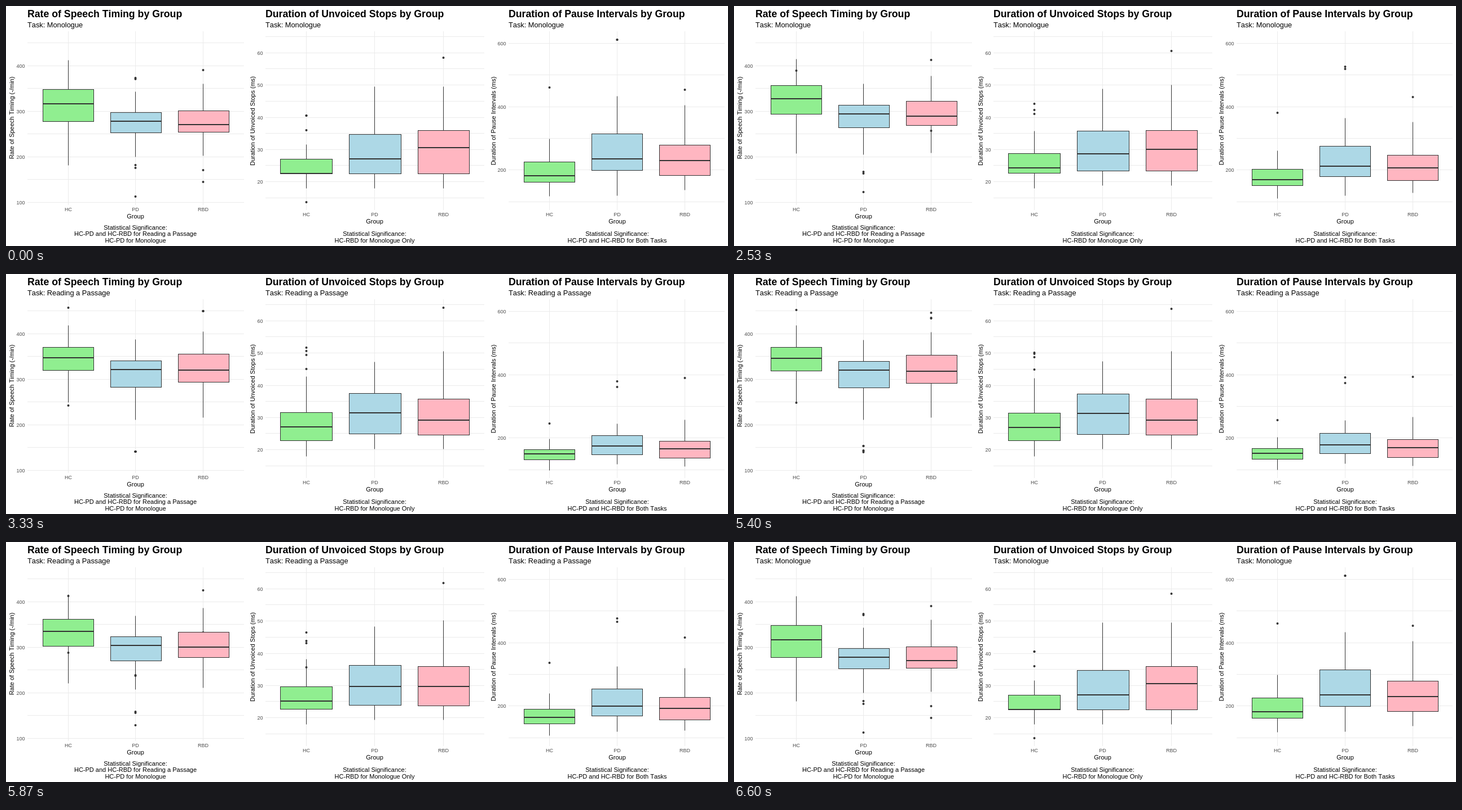
Animation, 1280 px wide and 427 px high, one loop 6670 ms. Source, as an HTML page with a canvas:

```html
<!DOCTYPE html>
<html lang="en">
<head>
<meta charset="utf-8">
<title>Speech measures by group</title>
<style>
  html, body { margin: 0; width: 100%; height: 100%; overflow: hidden; background: #fff; }
  canvas { display: block; }
</style>
</head>
<body>
<canvas id="stage" width="1280" height="427"></canvas>
<script>
const ctx = document.getElementById('stage').getContext('2d');
const LOOP = 6670, FRAMES = 100, TRAVEL = 19;
const FILLS = ['#90ee90', '#add8e6', '#ffb6c1'];
const GROUPS = ['HC', 'PD', 'RBD'];
const INK = '#333333';

// Each box: [upper whisker, box top, median, box bottom, lower whisker] per task.
// Each dot: [height for Monologue, height for Reading a Passage].
const panels = [
  {
    title: 'Rate of Speech Timing by Group', yTitle: 'Rate of Speech Timing (-/min)',
    left: 38, right: 422, bottom: 354, yTitleX: 14, yTitleY: 199,
    ticks: { 400: 106, 300: 187, 200: 268, 100: 349 }, minor: [65, 146, 227, 308],
    centers: [110, 229, 349], lefts: [65, 185, 305], widths: [90, 90, 90],
    caption: ['Statistical Significance:', 'HC-PD and HC-RBD for Reading a Passage', 'HC-PD for Monologue'],
    boxes: [
      { from: [96, 148.5, 174, 205.5, 283], to: [91.5, 130, 148.5, 171, 228],
        dots: [[147, 59.5], [147, 234]], hiddenAtStart: true },
      { from: [152, 189.5, 204.5, 225.5, 268], to: [116, 154, 169.5, 201.5, 259],
        dots: [[128, 316], [130, 316], [283, 316], [288, 316], [339, 316]] },
      { from: [138, 186, 210.5, 224.5, 266], to: [102, 142.5, 170.5, 192.5, 255],
        dots: [[114, 66], [292, 66], [313, 66]] }
    ]
  },
  {
    title: 'Duration of Unvoiced Stops by Group', yTitle: 'Duration of Unvoiced Stops (ms)',
    left: 460, right: 848, bottom: 363, yTitleX: 441, yTitleY: 204.5,
    ticks: { 60: 83, 50: 140, 40: 198, 30: 255, 20: 312 }, minor: [54, 111, 169, 226, 283, 341],
    centers: [532, 653, 775], lefts: [486, 608, 730], widths: [92, 92, 91],
    caption: ['Statistical Significance:', 'HC-RBD for Monologue Only'],
    boxes: [
      { from: [246, 272, 298, 298, 324], to: [182, 246.5, 272, 296.5, 324],
        dots: [[195, 137], [221, 143.5], [349, 131], [195, 169]] },
      { from: [143, 228, 272, 298.5, 324], to: [156.5, 212.5, 246.5, 284.5, 311], dots: [] },
      { from: [143, 221, 252, 298.5, 324], to: [137, 222.5, 260, 286, 311], dots: [[92, 60]] }
    ]
  },
  {
    title: 'Duration of Pause Intervals by Group', yTitle: 'Duration of Pause Intervals (ms)',
    left: 891, right: 1274, bottom: 363, yTitleX: 868, yTitleY: 204.5,
    ticks: { 600: 66, 400: 179, 200: 291 }, minor: [122, 235, 348],
    centers: [963, 1083, 1203], lefts: [918, 1038, 1158], widths: [90, 90, 90],
    caption: ['Statistical Significance:', 'HC-PD and HC-RBD for Both Tasks'],
    boxes: [
      { from: [236, 277, 302, 313.5, 338], to: [293, 312.5, 320, 330.5, 349], dots: [[145, 266]] },
      { from: [160, 227, 272, 292.5, 337], to: [266, 287, 306, 321.5, 338], dots: [[60, 191], [60, 201]] },
      { from: [176, 247.5, 275, 301, 327], to: [259, 297.5, 311, 327.5, 342], dots: [[148.5, 185]] }
    ]
  }
];

const mix = (a, b, p) => a + (b - a) * p;
const clamp = v => Math.max(0, Math.min(1, v));
const snap = v => Math.floor(v) + 0.5;

function write(text, x, y, size, align = 'center', color = '#000', weight = '') {
  ctx.font = `${weight} ${size}px "Liberation Sans", Arial, sans-serif`;
  ctx.fontKerning = 'none';
  ctx.textAlign = align;
  ctx.fillStyle = color;
  ctx.fillText(text, x, y);
}

function line(x1, y1, x2, y2, color) {
  ctx.strokeStyle = color;
  ctx.lineWidth = 1;
  ctx.beginPath();
  ctx.moveTo(x1, y1);
  ctx.lineTo(x2, y2);
  ctx.stroke();
}

function drawAxes(panel, task) {
  const { left, right, bottom, centers, ticks, caption } = panel;
  for (const y of [...panel.minor, ...Object.values(ticks)]) line(left, y + 0.5, right, y + 0.5, '#ebebeb');
  for (const x of centers) line(x + 0.5, 45, x + 0.5, bottom, '#ebebeb');

  write(panel.title, left, 20, 17.7, 'left', '#000', 'bold');
  write('Task: ' + task, left, 38, 12.8, 'left');
  for (const label in ticks) write(label, left - 4.5, ticks[label] + 4, 9, 'right', '#4d4d4d');
  centers.forEach((x, i) => write(GROUPS[i], x + 0.5, bottom + 11, 9, 'center', '#4d4d4d'));

  const middle = centers[1] + 0.5;
  write('Group', middle, bottom + 24, 11);
  caption.forEach((text, i) => write(text, middle, 421 - Math.round((caption.length - 1 - i) * 11.6), 11));

  ctx.save();
  ctx.translate(panel.yTitleX, panel.yTitleY);
  ctx.rotate(-Math.PI / 2);
  write(panel.yTitle, 0, 0, 11);
  ctx.restore();
}

function drawBox(box, x, left, width, fill, p) {
  const heights = box.from.map((v, i) => mix(v, box.to[i], p));
  const [high, top, , low, end] = heights.map(snap);
  const median = Math.round(heights[2]);

  if (p > 0 || !box.hiddenAtStart) {
    ctx.fillStyle = INK;
    for (const [a, b] of box.dots) {
      ctx.beginPath();
      ctx.arc(x + 0.5, Math.round(mix(a, b, p)), 2, 0, Math.PI * 2);
      ctx.fill();
    }
  }
  line(x + 0.5, high, x + 0.5, top, INK);
  line(x + 0.5, low, x + 0.5, end, INK);
  ctx.fillStyle = fill;
  ctx.fillRect(left + 0.5, top, width, low - top);
  ctx.strokeRect(left + 0.5, top, width, low - top);
  ctx.fillStyle = INK;
  ctx.fillRect(left, median - 1, width + 1, 2);
}

// Frame starts fall on whole hundredths of a second.
function frameAt(time) {
  let frame = FRAMES - 1;
  while (frame > 0 && Math.round(frame * 20 / 3) * 10 > time) frame--;
  return frame;
}

function draw(time) {
  const frame = frameAt(time);
  const p = clamp((frame - 31) / TRAVEL) - clamp((frame - 80) / TRAVEL);
  const task = frame >= 42 && frame < 91 ? 'Reading a Passage' : 'Monologue';
  ctx.fillStyle = '#fff';
  ctx.fillRect(0, 0, 1280, 427);
  for (const panel of panels) {
    drawAxes(panel, task);
    panel.boxes.forEach((box, i) =>
      drawBox(box, panel.centers[i], panel.lefts[i], panel.widths[i], FILLS[i], p));
  }
}

const start = performance.now();
function tick() {
  draw((performance.now() - start) % LOOP);
  requestAnimationFrame(tick);
}
tick();
</script>
</body>
</html>
```
